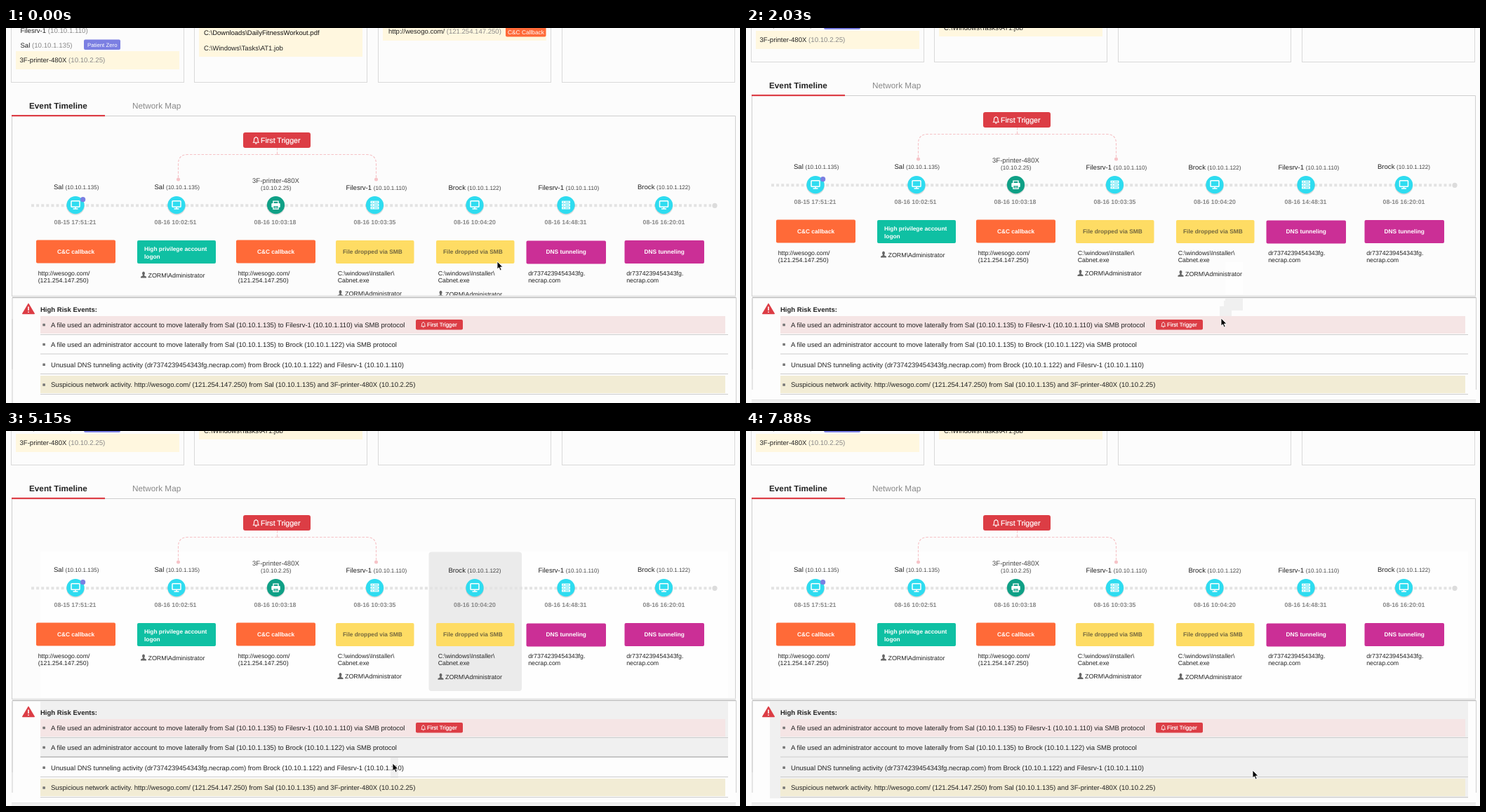
Recreate the animation shown at these times as an HTML page. Size 1046 by 535 pixels, loop 8 s.

```html
<!DOCTYPE html>
<html lang="en">
<head>
<meta charset="utf-8">
<title>Event timeline</title>
<style>
html, body { margin: 0; width: 100%; height: 100%; overflow: hidden; background: #fcfcfc; }
svg { display: block; width: 1046px; height: 535px; font-family: "Liberation Sans", Arial, sans-serif; text-rendering: geometricPrecision; }
text { white-space: pre; }
</style>
</head>
<body>
<svg id="stage" viewBox="0 0 1046 535"></svg>
<script>
const RED = '#dc3d45', CYAN = '#2edcf0', GREEN = '#0fa086', PURPLE = '#7b7fe2';
const ORANGE = '#ff6a38', TEAL = '#0fc0a3', YELLOW = '#fedc64', MAGENTA = '#cb2f96';
const CREAM = '#fff7df', INK = '#222', GREY = '#888';

const rect = (x, y, w, h, fill, r = 0, more = '') =>
  `<rect x="${x}" y="${y}" width="${w}" height="${h}" rx="${r}" fill="${fill}" ${more}/>`;
const line = (d, color, width = 1, more = '') =>
  `<path d="${d}" fill="none" stroke="${color}" stroke-width="${width}" ${more}/>`;
const dot = (x, y, r, fill) => `<circle cx="${x}" cy="${y}" r="${r}" fill="${fill}"/>`;
const text = (x, y, size, str, fill = INK, more = '') =>
  `<text x="${x}" y="${y}" font-size="${size}" fill="${fill}" ${more}>${str.replace(/&/g, '&amp;')}</text>`;
const bold = (x, y, size, str, fill) => text(x, y, size, str, fill, 'font-weight="700"');
const at = (x, y, body, scale = 1) => `<g transform="translate(${x} ${y}) scale(${scale})">${body}</g>`;
const host = (x, y, name, ip, size, ipFill) =>
  text(x, y, 9.56, `${name} <tspan font-size="${size}" fill="${ipFill}">(${ip})</tspan>`);

const bell = line('M-3.8 3C-2.5 1.5-2.9 0-2.7-1.6C-2.4-5.2 2.4-5.2 2.7-1.6C2.9 0 2.5 1.5 3.8 3ZM-1.2 4.6H1.2M0-4.3V-5.3', '#fff', 1.1);
const person = `<path d="M0 0a2.1 2.6 0 0 1 1.2 4.6L1.3 6 4 7.2V9H-4V7.2L-1.3 6-1.2 4.6A2.1 2.6 0 0 1 0 0Z" fill="#666"/>`;
const icons = {
  pc: rect(-6, -6, 12, 8.6, 'none', 0.8, 'stroke="#fff" stroke-width="1.5"') + line('M0 2.6V5M-3.5 5.4H3.5', '#fff', 1.5),
  server: [-6, -1.8, 2.4].map(y => rect(-6, y, 12, 3.4, '#fff') +
    line(`M-4.5 ${y + 1.7}H-2.6M-1 ${y + 1.7}H4.6`, CYAN, 0.9)).join(''),
  printer: line('M-3.5-2V-5.6H3.5V-2', '#fff', 1.4) + rect(-6.2, -2.6, 12.4, 6, '#fff', 1) +
    rect(-3.6, 0.6, 7.2, 5, GREEN, 0, 'stroke="#fff" stroke-width="1.3"') + line('M-2 2.3H2M-2 4H2', '#fff', 0.7)
};

// centre, icon, label x, name, ip, date x, date
const nodes = [
  [99, 'pc', 68, 'Sal', '10.10.1.135', 68.5, '08-15 17:51:21'],
  [243, 'pc', 211.5, 'Sal', '10.10.1.135', 211.5, '08-16 10:02:51'],
  [384.5, 'printer', 351, '3F-printer-480X', '10.10.2.25', 353.5, '08-16 10:03:18'],
  [525.5, 'server', 484.5, 'Filesrv-1', '10.10.1.110', 495.5, '08-16 10:03:35'],
  [668, 'pc', 630.5, 'Brock', '10.10.1.122', 638, '08-16 10:04:20'],
  [798, 'server', 758.5, 'Filesrv-1', '10.10.1.110', 767.5, '08-16 14:48:31'],
  [937.5, 'pc', 900, 'Brock', '10.10.1.122', 907.5, '08-16 16:20:01']
];
const node = ([x, icon, lx, name, ip, dx, date]) => {
  const stacked = icon === 'printer', y = lx === 484.5 || lx === 630.5 || lx === 758.5 ? 202 : 201;
  const label = stacked
    ? text(lx, 191.5, 9.56, name, '#444') + text(363, 201.5, 8.07, `(${ip})`, '#444')
    : host(lx, y, name, ip, 8.07, '#444');
  return label + dot(x, 224.8, 13, 'rgba(0,0,0,.13)') + dot(x, 223.7, 12.6, stacked ? GREEN : CYAN) +
    at(x, 223.7, icons[icon]) + bold(dx, 251.2, 8.78, date, GREY);
};

// x, y, width, colour, caption x, caption, detail lines
const url = ['http://wesogo.com/', '(121.254.147.250)'];
const path = ['C:\\windows\\Installer\\', 'Cabnet.exe'];
const dns = ['dr7374239454343fg.', 'necrap.com'];
const cards = [
  [43, 273.5, 113, ORANGE, 73, ['C&C callback'], url],
  [187, 274, 112, TEAL, 197, ['High privilege account', 'logon'], []],
  [328, 273.5, 113, ORANGE, 358, ['C&C callback'], url],
  [470, 274, 111.5, YELLOW, 480, ['File dropped via SMB'], path],
  [613, 274, 111.5, YELLOW, 623, ['File dropped via SMB'], path],
  [741.5, 274.5, 113.5, MAGENTA, 769.5, ['DNS tunneling'], dns],
  [881.5, 274, 113.5, MAGENTA, 909.5, ['DNS tunneling'], dns]
];
const card = ([x, y, w, fill, cx, caption, detail]) =>
  rect(x, y, w, 33, fill, 2) +
  caption.map((s, i) => bold(cx, (caption.length > 1 ? 289 : 293.3) + i * 10.6, 8.33, s, fill === YELLOW ? '#74683f' : '#fff')).join('') +
  detail.map((s, i) => text(x + 2.7, 324.2 + i * 10.2, 8.8, s)).join('');
const admin = (x, y) => at(x, y - 8, person) + text(x + 6.5, y, 8.9, 'ZORM\\Administrator');

const trigger = at(356.3, 131.3, bell) + text(363, 135, 10.6, 'First Trigger', '#fff', 'stroke="#fff" stroke-width=".2"');
const columns = [[], [1, 3], [4], [5, 6], [0, 2]];
const columnLeft = i => [34, 177, 318.5, 459.5, 602.5, 732, 872][i];

const summary =
  [7.5, 268.5, 530.5, 792.5].map(x => rect(x, -60.5, 246, 109, 'none', 0, 'stroke="#d9d9d9"')).join('') +
  rect(14, 4, 233, 26, CREAM) +
  host(20.5, -22.5, 'Filesrv-1', '10.10.1.110', 9.7, GREY) +
  host(20.5, -1.5, 'Sal', '10.10.1.135', 9.7, GREY) +
  host(19.5, 20, '3F-printer-480X', '10.10.2.25', 9.7, GREY) +
  rect(111, -12.5, 52, 14.5, PURPLE, 2) + text(116, -2.3, 7.8, 'Patient Zero', '#fff') +
  rect(275, -40, 233, 52, CREAM) +
  text(282, -19, 9.5, 'C:\\Downloads\\DailyFitnessWorkout.pdf', '#111') +
  text(282, 2.5, 9.56, 'C:\\Windows\\Tasks\\AT1.job') +
  rect(537, -40, 233, 29, CREAM) + host(545, -21, 'http://wesogo.com/', '121.254.147.250', 9.56, GREY) +
  rect(712, -31, 57.5, 14.5, ORANGE, 2) + text(715, -20.5, 8.33, 'C&C Callback', '#fff');

const timeline =
  bold(33, 86.3, 11.76, 'Event Timeline') + text(180, 85.5, 11.75, 'Network Map', GREY) +
  line('M8.5 400V96.5H1039.5V400', '#cfcfcf') + rect(8, 95, 133, 2.2, RED);

const flow =
  line('M386.5 142V151.5M386.5 151.5H259Q245.5 151.5 245.5 165V186M386.5 151.5H514Q527.5 151.5 527.5 165V186', '#f6c3c7', 1.1, 'stroke-dasharray="3.5 2"') +
  dot(245.5, 187, 2.5, '#f6c3c7') + dot(527.5, 187, 2.5, '#f6c3c7') +
  rect(338, 120, 96, 22, RED, 3) + trigger +
  line('M36 224.3H1005', '#e3e3e3', 4, 'stroke-dasharray="4 3.1"') + dot(1010, 224.3, 3.6, '#dcdcdc') +
  nodes.map(node).join('') + dot(109.6, 215.7, 3.6, PURPLE) +
  cards.map(card).join('') + admin(196, 326.5) + admin(476.5, 353) + admin(619.5, 353.7);

const risks = [
  [426.7, 'A file used an administrator account to move laterally from Sal (10.10.1.135) to Filesrv-1 (10.10.1.110) via SMB protocol'],
  [454.7, 'A file used an administrator account to move laterally from Sal (10.10.1.135) to Brock (10.10.1.122) via SMB protocol'],
  [483.5, 'Unusual DNS tunneling activity (dr7374239454343fg.necrap.com) from Brock (10.10.1.122) and Filesrv-1 (10.10.1.110)'],
  [512.2, 'Suspicious network activity. http://wesogo.com/ (121.254.147.250) from Sal (10.10.1.135) and 3F-printer-480X (10.10.2.25)']
];
const ruleY = [437.5, 465, 493.5, 522.5];
const riskList =
  `<path d="M32 393.5L40.3 407.5H23.7Z" fill="${RED}" stroke="${RED}" stroke-width="1.4" stroke-linejoin="round"/>` +
  line('M32 397.5V403M32 404.4V406', '#fff', 1.6) +
  bold(49, 405.2, 9.53, 'High Risk Events:') +
  rect(49, 411, 976, 25, '#f5e5e5') + rect(49, 496, 976, 25, '#f2ecd5') +
  ruleY.map(y => line(`M49 ${y}H1029`, '#cccccc', 1, 'class="rule"')).join('') +
  risks.map(([y, s]) => rect(52.3, y - 5, 3.6, 3.6, '#777', 0.6) + text(64, y, 9.56, s)).join('') +
  rect(584, 416, 67, 14.5, RED, 2) + at(594.7, 423.4, bell, 0.75) +
  text(600, 426.2, 8, 'First Trigger', '#fff', 'stroke="#fff" stroke-width=".2"');

// start, x, y, right, bottom
const paleTints = [[1230, 683, 334, 708, 380], [2800, 49, 172, 1029, 381], [6370, 34, 172, 1029, 381]];
const greyTints = [
  [1230, 683, 386, 708, 403], [1520, 681, 389, 692, 411], [2030, 675, 397, 690, 411],
  [2800, 49, 386, 1029, 438], [4040, 49, 386, 1029, 464], [5150, 548, 466, 559, 495],
  [5300, 49, 386, 1029, 495], [6370, 34, 386, 1029, 524]
];
const tints = (list, fill) => list.map(([t, x, y, r, b]) => rect(x, y, r - x, b - y, fill, 0, `class="tint" data-t="${t}"`)).join('');

const arrow = '<path d="M0 0V11L2.5 8.8 4.3 13 6.2 12.2 4.4 8.1H7.9Z" fill="#000" stroke="#fff" stroke-width=".9"/>';
const beamPath = 'M-2.5-6Q0-6 0-4.5V4.5Q0 6-2.5 6M2.5-6Q0-6 0-4.5M0 4.5Q0 6 2.5 6M-1.3 2H1.3';
const beam = line(beamPath, '#fff', 2.2, 'opacity=".7"') + line(beamPath, '#222', 1);

const stage = document.getElementById('stage');
stage.innerHTML =
  `<clipPath id="view"><rect width="1046" height="383"/></clipPath>` + rect(0, 0, 1046, 535, '#fcfcfc') +
  `<g clip-path="url(#view)"><g class="scroll">${summary}${timeline}${tints(paleTints, '#fefefe')}` +
  columns.map((list, i) => `<g class="hover" data-row="${i}">${list.map(c => rect(columnLeft(c), 172.5, 132.5, 198.5, '#ebebeb', 4)).join('')}</g>`).join('') +
  `${flow}</g></g>` +
  rect(9, 381.5, 1031, 3, '#e6e6e6') + rect(9, 385, 1031, 150, '#fdfdfd') + line('M9 384.7H1040.5', '#bdbdbd', 1.2) +
  `<g class="scroll">${line('M9 386V516M1040.5 386V516', '#cfcfcf')}${rect(8, 530, 1032, 40, '#efefef')}${line('M8 530.5H1040', '#e2e2e2')}</g>` +
  line('M9 385V487M1040.5 385V487', '#cfcfcf') +
  tints(greyTints, '#f0f0f0') + riskList +
  `<g id="arrow">${arrow}</g><g id="beam">${beam}</g>`;

// start, cursor x, cursor y, hovered row, text cursor, scroll left to go
const steps = [
  [0, 700, 333, 0, 0, 29], [180, 700, 333, 0, 0, 1], [510, 700, 333, 0, 0, 0],
  [1230, 683, 389], [1520, 681, 397], [2030, 677, 414], [2210, 676, 422], [2360, 675, 427],
  [2650, 640, 426], [2800, 568, 424, 1, 1], [2950, 562, 424, 1, 1], [3090, 560, 424, 1, 1],
  [3840, 561, 439, 1], [4040, 561, 449], [4190, 558, 452, 2, 1], [4370, 555, 452, 2, 1],
  [5150, 551, 474, 2], [5300, 549, 480, 3, 1], [5440, 549, 481, 3, 1],
  [6220, 549, 500, 3], [6370, 549, 510, 4, 1], [6520, 549, 510, 4, 1],
  [7450, 595, 505, 4], [7600, 660, 495], [7740, 706, 488], [7880, 722, 484]
];
const all = selector => [...stage.querySelectorAll(selector)];
const parts = { scroll: all('.scroll'), hover: all('.hover'), rule: all('.rule'), tint: all('.tint') };
const show = (el, on) => el.setAttribute('visibility', on ? 'visible' : 'hidden');
const move = (el, x, y) => el.setAttribute('transform', `translate(${x} ${y})`);
const pointers = ['arrow', 'beam'].map(id => document.getElementById(id));

let shown;
function draw(t) {
  const step = steps.findLast(s => s[0] <= t);
  if (step === shown) return;
  shown = step;
  const [, x, y, row = 0, typing = 0, scroll = 0] = step;
  parts.scroll.forEach(el => move(el, 0, scroll));
  parts.hover.forEach((el, i) => show(el, i === row));
  parts.rule.forEach((el, i) => el.setAttribute('stroke', i === row - 1 ? '#8e8e8e' : '#cccccc'));
  parts.tint.forEach(el => show(el, t >= +el.dataset.t));
  pointers.forEach((el, i) => { show(el, i === typing); move(el, x, y); });
}

const start = performance.now();
function tick() {
  draw((performance.now() - start) % 8000);
  requestAnimationFrame(tick);
}
tick();
</script>
</body>
</html>
```
